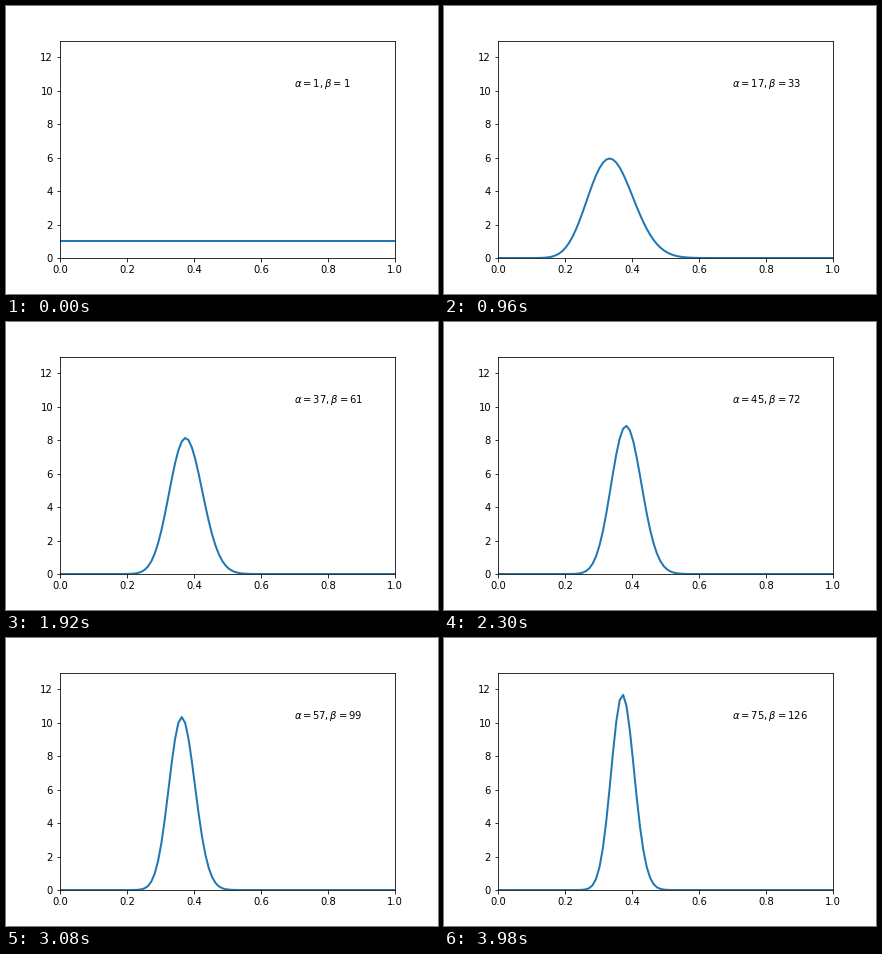
Animation of 432 by 288 pixels, one loop 4000 ms. Source, as a matplotlib script:

```python
from math import lgamma

import matplotlib.pyplot as plt
import numpy as np
from matplotlib.animation import FuncAnimation

FRAMES = 200
# Number of trials seen, and the alpha reached by then.
TRIALS = [0, 31, 65, 96, 133, 154, 189, 199]
ALPHAS = [1, 12, 22, 37, 53, 57, 74, 75]

x = np.linspace(0, 1, 100)


def beta_pdf(a, b):
    scale = np.exp(lgamma(a + b) - lgamma(a) - lgamma(b))
    return scale * x ** (a - 1) * (1 - x) ** (b - 1)


def posterior(trials):
    a = int(np.interp(trials, TRIALS, ALPHAS) + 0.5)
    return a, trials + 2 - a


fig, ax = plt.subplots(figsize=(6, 4), dpi=72)
fig.subplots_adjust(left=0.125, right=0.9, bottom=0.125, top=0.88)
ax.set(xlim=(0, 1), ylim=(0, 13))
line, = ax.plot([], [], lw=2)
label = ax.text(0.7, 0.8, "", transform=ax.transAxes, va="center")


def update(i):
    a, b = posterior(i)
    line.set_data(x, beta_pdf(a, b))
    label.set_text(rf"$\alpha={a}, \beta={b}$")
    return line, label


anim = FuncAnimation(fig, update, frames=FRAMES, interval=20,
                     repeat=True, repeat_delay=0)
plt.show()
```
